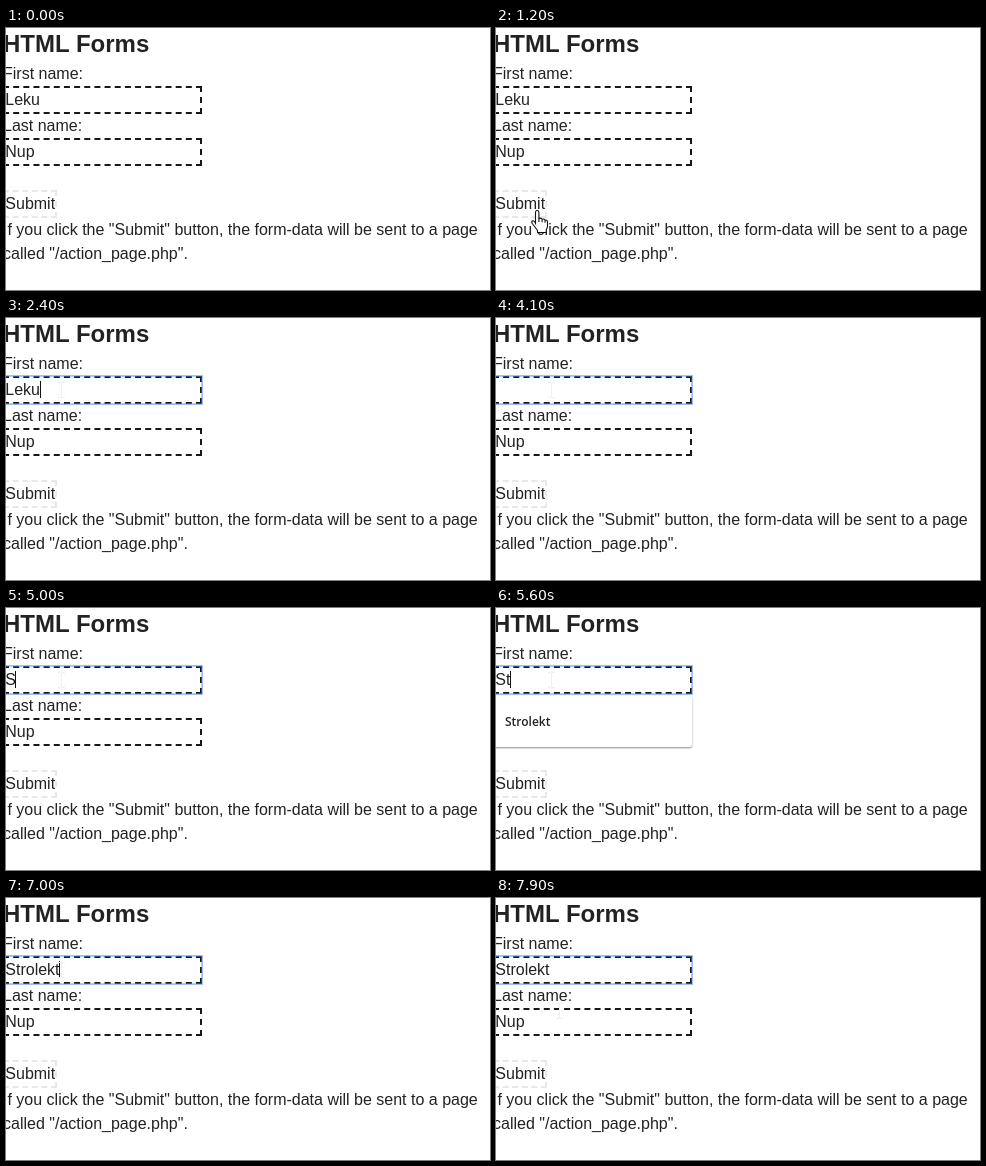
Animation of 484x262 px, one loop 8 s. Source, as an HTML page:

```html
<!DOCTYPE html>
<html lang="en">
<head>
<meta charset="utf-8">
<title>HTML Forms</title>
<style>
  html, body { margin: 0; width: 100%; height: 100%; overflow: hidden; background: #fff; }
  #stage { position: relative; width: 484px; height: 262px; overflow: hidden; }
  #stage > * { position: absolute; box-sizing: border-box; }
  svg { left: 0; top: 0; }
  text { font: 16px "Liberation Sans", Arial, sans-serif; fill: #222; white-space: pre; }
  text.title { font-size: 24px; font-weight: bold; }
  .box { left: -3px; width: 199px; height: 28px; border: 2px dashed #181818; }
  .button { width: 54px; border-color: #e8e8e8; }
  .focus { box-shadow: 0 0 0 1px #a3c0f5; outline: 1px solid rgba(77, 144, 254, .45); outline-offset: -1px; }
  #drop {
    left: -3px; top: 88px; width: 199px; height: 51px; padding-left: 12px;
    background: #fff; border-radius: 2px; box-shadow: 0 1px 2px rgba(0, 0, 0, .45);
    font: 600 12px/51px "Open Sans", "Noto Sans", sans-serif; color: #222;
  }
  .pointer { fill: #fff; stroke: #111; stroke-width: 1.1; stroke-linejoin: round; }
  #ibeam { fill: none; stroke: #efefef; }
</style>
</head>
<body>
<div id="stage">
  <div class="box" id="first" style="top:58px"></div>
  <div class="box" style="top:110px"></div>
  <div class="box button" style="top:162px"></div>
  <svg width="484" height="262">
    <text class="title" x="-3" y="24">HTML Forms</text>
    <text x="-3" y="51">First name:</text>
    <text id="value" x="-.7" y="77"></text>
    <text x="-3" y="103">Last name:</text>
    <text x="-.7" y="129">Nup</text>
    <text x="-.7" y="181">Submit</text>
    <text x="-3" y="207">If you click the "Submit" button, the form-data will be sent to a page</text>
    <text x="-3" y="231">called "/action_page.php".</text>
    <rect id="caret" y="63" width="1" height="17" fill="#111"/>
  </svg>
  <div id="drop">Strolekt</div>
  <svg width="484" height="262">
    <path id="arrow" class="pointer" d="M.5.5V16.5L4.2 13L6.7 18.6L9 17.6L6.6 12.2H11.7Z"/>
    <g id="hand" class="pointer">
      <path d="M4.5 14V2.2a1.7 1.7 0 0 1 3.4 0V8.5q2-1 3.2.8q2-.8 3 .9q2.4-.6 2.4 2V16q0 2-1.3 4V22.5H6.5V20.5Q4 17 1.2 13.5Q0 11 2 10.8Q3.5 11 4.5 13Z"/>
      <path d="M7.9 8.5V12M11.1 9.5V12.3M14.1 10.5V12.8" fill="none"/>
    </g>
    <path id="ibeam" d="M-3-7.5H-1L.5-7L2-7.5H4M.5-7V7M-3 7.5H-1L.5 7L2 7.5H4"/>
  </svg>
</div>
<script>
const LOOP = 8000;
const $ = id => document.getElementById(id);
const value = $("value"), caret = $("caret"), drop = $("drop");
const pointers = ["arrow", "hand", "ibeam"];

// Each track holds [start ms, state...] steps.
const typed = [
  [0, "Leku"], [3500, "Lek"], [4000, "L"], [4100, ""],
  [5000, "S"], [5400, "St"], [5900, "Str"], [6100, "Stro"],
  [6200, "Strol"], [6500, "Strole"], [6700, "Strolek"], [7000, "Strolekt"]
];
const caretOn = [[0, 0], [2400, 1], [2900, 0], [3500, 1], [7500, 0]];
const dropAlpha = [[0, 0], [5100, .5], [5200, 1], [7000, 0]];
const pointer = [
  [0, "", 0, 0],
  [500, "arrow", 44, 247], [600, "arrow", 42, 236], [700, "ibeam", 41, 214],
  [800, "hand", 36, 188], [900, "hand", 34, 183], [1200, "hand", 35, 182],
  [1800, "arrow", 52, 144], [1900, "ibeam", 57, 102], [2000, "ibeam", 55, 72],
  [7500, "ibeam", 55, 76], [7600, "ibeam", 57, 84], [7700, "ibeam", 60, 96],
  [7800, "ibeam", 62, 108], [7900, "ibeam", 63, 113]
];

const at = (track, t) => track.findLast(step => step[0] <= t);

function draw(now) {
  const t = now % LOOP;
  value.textContent = at(typed, t)[1];
  const width = value.textContent ? value.getComputedTextLength() : 0;
  caret.setAttribute("x", Math.floor(width - .7));
  caret.style.opacity = at(caretOn, t)[1];
  drop.style.opacity = at(dropAlpha, t)[1];
  $("first").classList.toggle("focus", t >= 2400);

  const [, kind, x, y] = at(pointer, t);
  for (const id of pointers) {
    $(id).style.display = id === kind ? "" : "none";
    $(id).setAttribute("transform", `translate(${x} ${y})`);
  }
}

const start = performance.now();
function tick() {
  draw(performance.now() - start);
  requestAnimationFrame(tick);
}
tick();
</script>
</body>
</html>
```
